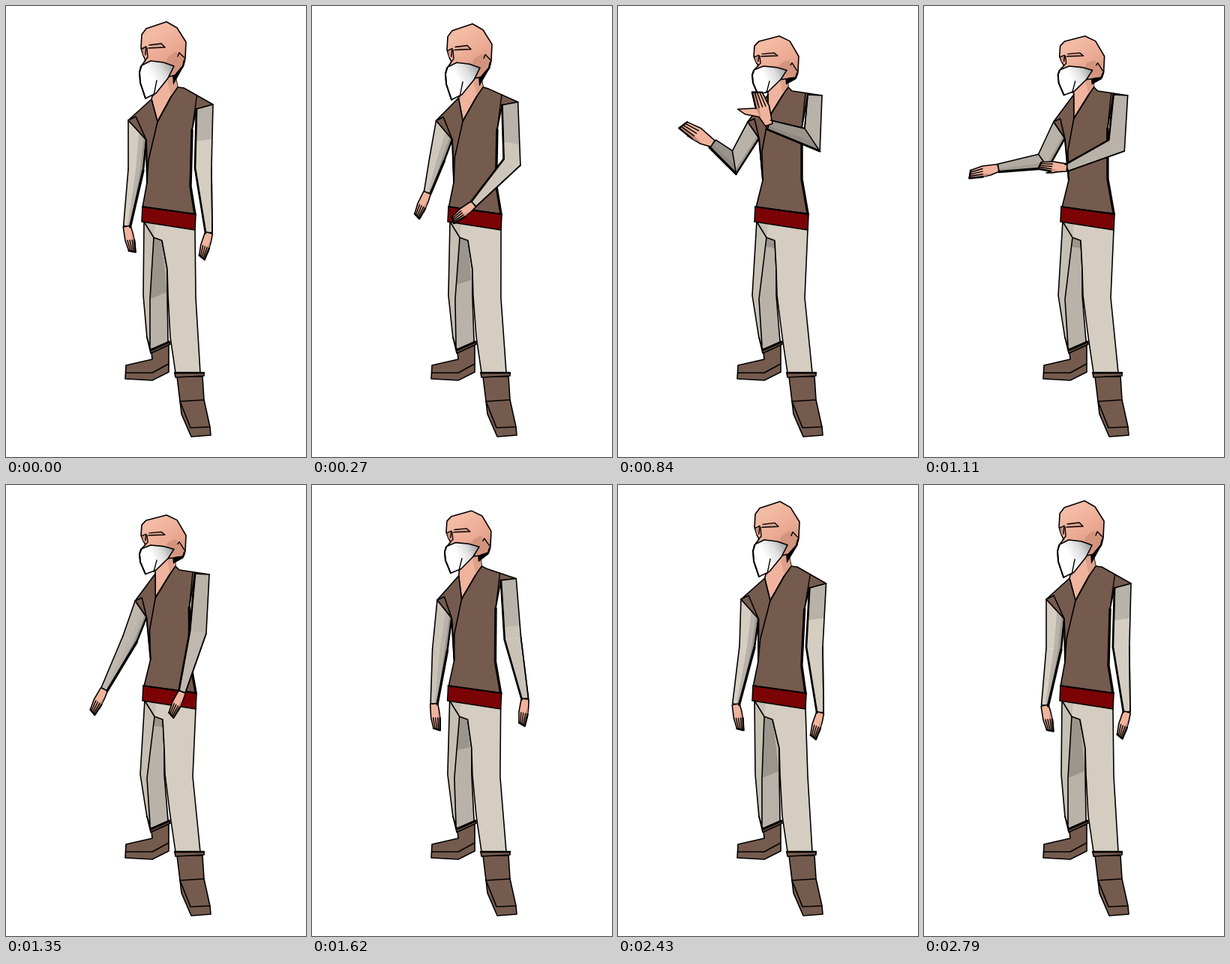
An HTML page with a canvas that plays this animation: 400 by 600 pixels, repeating every 2820 ms.

```html
<!DOCTYPE html>
<html lang="en">
<head>
<meta charset="utf-8">
<title>Old fighter</title>
<style>
html, body { margin: 0; width: 100%; height: 100%; overflow: hidden; background: #fff; }
canvas { display: block; }
</style>
</head>
<body>
<canvas id="stage" width="400" height="600"></canvas>
<script>
const ctx = document.getElementById('stage').getContext('2d');
const LOOP = 2820, STEP = 30, THIN = 1.6;
const VEST = '#755b4e', BELT = '#7b0205', SKIN = '#f0b39d', SKIN_DARK = '#c98e7a';
const cloth = k => `rgb(${[213, 205, 193].map(c => Math.round(c * k))})`;
const MID = cloth(.87), DARK = cloth(.73);

// body: crouch, hip shift, lean, head drop, head pitch
// arms: elbow x, elbow y, forearm angle, forearm length, hand bend (degrees)
const POSES = [
  { at: 0, body: [0, 0, 0, 0, 1], left: [173, 218, 99, 76, -21], right: [263, 215, 85, 87, 21] },
  { at: 480, body: [.6, 0, 0, 7, .97], left: [160, 194, 119, 27, 27], right: [269, 198, 176, 66, 2] },
  { at: 840, body: [1, 1, 1, 19, .77], left: [155, 208, 221, 38, -9], right: [259, 178, 199, 61, 51] },
  { at: 1350, body: [1, 1, 0, 19, .77], left: [165, 205, 117, 75, 0], right: [256, 196, 105, 82, 10] },
  { at: 1650, left: [171, 220, 96, 72, -13], right: [268, 205, 78, 82, 19] },
  { at: 1920, body: [0, -2, -2, 5, .89], left: [174, 223, 96, 70, -13], right: [262, 212, 82, 88, 19] },
  { at: 2430, body: [0, -2, 2, 1, .98], left: [172, 215, 101, 78, -21], right: [262, 215, 85, 88, 21] }
];

const UPRIGHT = poly('163,152 194,124 202,154 220,121 229,108 237,109 276,131 254,137 248,165 246,240 252,277 182,268 188,235 187,178 190,205 173,147');
const CROUCHED = poly('172,154 199,118 199,150 219,118 226,108 231,113 271,119 252,118 244,163 244,230 252,276 183,268 192,232 187,176 191,193 181,150');

function poly(s) { return s.split(' ').map(p => p.split(',').map(Number)); }
const clamp = x => Math.min(1, Math.max(0, x));
const mix = (a, b, u) => a.map((x, i) => x + (b[i] - x) * u);
const rad = deg => deg * Math.PI / 180;
const polar = ([x, y], ang, r) => [x + r * Math.cos(ang), y + r * Math.sin(ang)];
const heading = (a, b) => Math.atan2(b[1] - a[1], b[0] - a[0]);

// Cyclic monotone cubic through the poses that set this part
function track(part) {
  const keys = POSES.filter(p => p[part]), n = keys.length;
  const key = i => ({ t: keys[(i + n) % n].at + LOOP * Math.floor(i / n), v: keys[(i + n) % n][part] });
  const soft = (p, q) => p * q > 0 ? 2 * p * q / (p + q) : 0;
  return t => {
    const i = keys.filter(k => k.at <= t).length - 1;
    const [a, b, c, d] = [-1, 0, 1, 2].map(o => key(i + o));
    const h = c.t - b.t, u = (t - b.t) / h, w = 1 - u;
    return b.v.map((y, j) => {
      const slope = (p, q) => (q.v[j] - p.v[j]) / (q.t - p.t);
      const m0 = soft(slope(a, b), slope(b, c)) * h, m1 = soft(slope(b, c), slope(c, d)) * h;
      return w * w * (1 + 2 * u) * y + u * u * (3 - 2 * u) * c.v[j] + u * w * w * m0 - u * u * w * m1;
    });
  };
}
const body = track('body'), left = track('left'), right = track('right');

function path(p, close) {
  ctx.beginPath();
  p.forEach(q => ctx.lineTo(...q));
  if (close) ctx.closePath();
}
function fill(p, color) {
  path(p, true);
  ctx.fillStyle = color;
  ctx.fill();
}
function line(p, width = THIN, close = false) {
  path(p, close);
  ctx.lineWidth = width;
  ctx.stroke();
}
function face(p, color) {
  fill(p, color);
  line(p, THIN, true);
}
function fade([a, b], ...colors) {
  const g = ctx.createLinearGradient(...a, ...b);
  colors.forEach((c, i) => g.addColorStop(i / (colors.length - 1), c));
  return g;
}

function hand(wrist, ang, lift, bend) {
  const size = 36 + 13 * lift, thumb = 24 * lift * clamp(bend / 45);
  const at = (along, side) => polar(polar(wrist, ang, along * size), ang + Math.PI / 2, side);
  const wide = 6 + 3 * lift;
  const root = [at(.5, wide), at(.55, -wide)], tip = [at(.9, wide * .7), at(1, -wide * .7)];
  face([at(0, 5), root[0], ...tip, root[1], at(.7, -wide - thumb), at(.5, -wide - thumb * .7), at(.3, -wide), at(0, -5)], SKIN);
  fill([root[1], tip[1], mix(...tip, .5), at(.25, -wide * .8)], SKIN_DARK);
  for (const u of [.25, .5, .75]) line([mix(...tip, u), mix(...root, u)], 1.4);
  line([...tip, root[1]], 2.4);
}

// Sleeve from two shoulder points through a mitred elbow to the wrist
function arm([ex, ey, deg, reach, bend], front, back, width, crouch, shadow) {
  const ang = rad(deg), elbow = [ex, ey], wrist = polar(elbow, ang, reach);
  const lift = clamp((deg - 100) / 100) ** 3;
  const tint = (1 - .1 * crouch) * (1 - .2 * lift);
  const upperAng = heading(mix(front, back, .5), elbow), half = (ang - upperAng) / 2;
  const miter = width / Math.max(.5, Math.cos(half)), across = upperAng + half + Math.PI / 2;
  const inner = polar(elbow, across, miter), outer = polar(elbow, across, -miter);
  const cuff = [4.5 + 2 * lift, -4.5 - 2 * lift].map(r => polar(wrist, ang + Math.PI / 2, r));

  fill([front, inner, outer, back], cloth(Math.max(tint, .87)));
  shadow(inner, outer, cuff, tint);
  line([inner, front, back, outer]);
  const fore = [inner, ...cuff, outer];
  if (lift > .3) {
    fill(fore, cloth(tint));
    fill([mix(inner, outer, .6), mix(...cuff, .6), cuff[1], outer], cloth(tint * .92));
    line([outer, inner]);
  }
  line(fore);
  hand(wrist, ang + rad(bend), lift, bend);
  return { inner, outer, cuff, lift };
}

function leftArm(t, b, crouch) {
  const { outer, cuff } = arm(left(t), b[0], b[13], 10, crouch, (inner, outer, cuff, tint) => {
    fill([inner, ...cuff, outer], cloth(tint));
    fill([mix(b[0], b[13], .6), mix(inner, outer, .5), mix(...cuff, .6), cuff[1], outer, b[13]], MID);
    fill([mix(b[0], b[13], .85), mix(inner, outer, .8), cuff[1], outer, b[13]], DARK);
  });
  line([b[13], outer], 2.4);
  line([outer, cuff[1]], 3.4);
}

function rightArm(t, b, crouch) {
  const { inner, outer, cuff, lift } = arm(right(t), b[7], b[6], 11, crouch, (inner, outer, cuff, tint) => {
    const part = .55 + .45 * crouch;
    fill([inner, ...cuff, outer], cloth(tint));
    fill([b[7], mix(b[7], inner, part), mix(b[6], outer, part), b[6]], MID);
  });
  line([b[7], inner, cuff[0]], THIN + 1.1 * (1 - lift));
  line([outer, cuff[1]], THIN + 1.2 * lift);
}

function legs(hip, crouch) {
  const h = s => poly(s).map(([x, y]) => [x + hip, y]);
  const k = s => poly(s).map(([x, y]) => [x - 4 * crouch, y]);
  const seam = [...h('197,308'), ...k('192,390'), [192, 452]];
  const inner = [...h('208,312'), ...k('215,350 215,385')];
  const outer = [...h('184,286'), ...k('183,385'), [188, 442]];
  fill([...outer, [193, 459], [217, 448], ...inner.slice().reverse(), ...h('210,290')], MID);
  fill([...outer, ...seam.slice().reverse(), ...h('197,290')], cloth(.93));
  const depth = 1 - .85 * crouch;
  fill([seam[0], inner[0], mix(inner[0], inner[2], depth * .94), mix(seam[0], seam[1], depth)], DARK);
  line(outer);
  line(seam);
  line([...inner, [216, 446]]);
  const near = [...h('184,287 252,297'), ...k('253,388'), [259, 488], [226, 488], [219, 440],
    ...k('216,385 215,350'), ...h('208,312 197,308')];
  fill(near, cloth(1));
  fill(h('185,288 199,290 197,308 188,302'), cloth(.93));
  line([...near.slice(1), near[0]]);
}

function boots() {
  face(poly('194,461 217,451 217,487 195,498 159,496 160,478 195,470'), VEST);
  line(poly('160,488 195,488 217,476'));
  face(poly('188,441 193,457 218,446 219,450 193,462'), VEST);
  line(poly('193,458 218,447'), 2.6);
  face(poly('228,493 262,493 264,524 272,560 273,571 247,573 234,543 232,526'), VEST);
  line(poly('232,526 264,524'));
  line(poly('232,526 246,561 272,560'));
  face(poly('225,488 264,488 264,492 226,494'), VEST);
  line(poly('225,488 264,488'), 2.4);
}

function torso(b, hip, at) {
  const [jaw, chin] = at('225,90 199,104');
  face([b[1], b[2], b[3], b[4], jaw, chin], SKIN);
  fill([b[3], b[4], jaw, mix(jaw, chin, .4)], '#dda08b');
  face(b.slice(0, 14), VEST);
  line([b[3], b[2], b[14], b[12]]);
  line([b[0], b[15], b[13]]);
  line([mix(b[5], b[6], .45), b[8]], 1.4);
  line([b[8], b[9], b[10]], 3.4);
  line([b[13], b[12]], 2);
  const belt = poly('182,267 253,277 252,298 181,287').map(([x, y]) => [x + hip, y]);
  face(belt, BELT);
  line(belt.slice(0, 2), 2.2);
}

function head(at) {
  fill(at('239,72 236,82 223,105 222,92'), '#000');
  face(at('181,38 187,30 214,21 228,29 240,48 239,70 236,80 226,92 200,98 185,90 181,79 186,72 183,66 180,56'),
    fade(at('200,35 232,85'), '#f3baa4', '#ebaa94', '#d3947e'));
  fill(at('216,68 226,61 237,67 235,79 224,88 212,78'), '#d3947e');
  fill(at('181,56 187,55 186,66 183,66'), SKIN_DARK);
  line(at('181,57 187,54 186,65'), 1.4);
  fill(at('192,51 207,50 212,55 194,56'), '#dda08b');
  line(at('191,52 207,50 212,55 190,56'), 1.4);
  line(at('188,56 189,68 185,73'), 1.4);
  line(at('229,67 231,62 238,69'), 1.4);
  line(at('238,72 236,80 226,92'), 2.6);
  face(at('178,88 181,79 193,73 210,75 224,80 216,96 200,116 186,123 179,102'),
    fade(at('224,80 196,98'), '#999', '#ddd', '#fff'));
  line(at('201,99 197,119'), 1.4);
  line(at('180,80 178,88 179,102 186,123'), 2);
}

function draw(t) {
  const [crouch, hip, lean, drop, pitch] = body(t);
  const b = UPRIGHT.map((p, i) => mix(p, CROUCHED[i], crouch))
    .map(([x, y]) => [x + lean + (hip - lean) * clamp((y - 110) / 165), y]);
  // The front of the head is foreshortened by the nod, the back is not
  const headAt = s => poly(s).map(([x, y]) => {
    const k = 1 + (pitch - 1) * clamp((240 - x) / 16);
    return [x + lean, 21 + drop + (y - 21) * k];
  });

  ctx.fillStyle = '#fff';
  ctx.fillRect(0, 0, 400, 600);
  leftArm(t, b, crouch);
  legs(hip, crouch);
  boots();
  torso(b, hip, headAt);
  head(headAt);
  rightArm(t, b, crouch);
}

ctx.lineJoin = ctx.lineCap = 'round';
ctx.strokeStyle = '#000';
const start = performance.now();
function tick() {
  const t = (performance.now() - start) % LOOP;
  draw(Math.floor(t / STEP) * STEP);
  requestAnimationFrame(tick);
}
tick();
</script>
</body>
</html>
```
